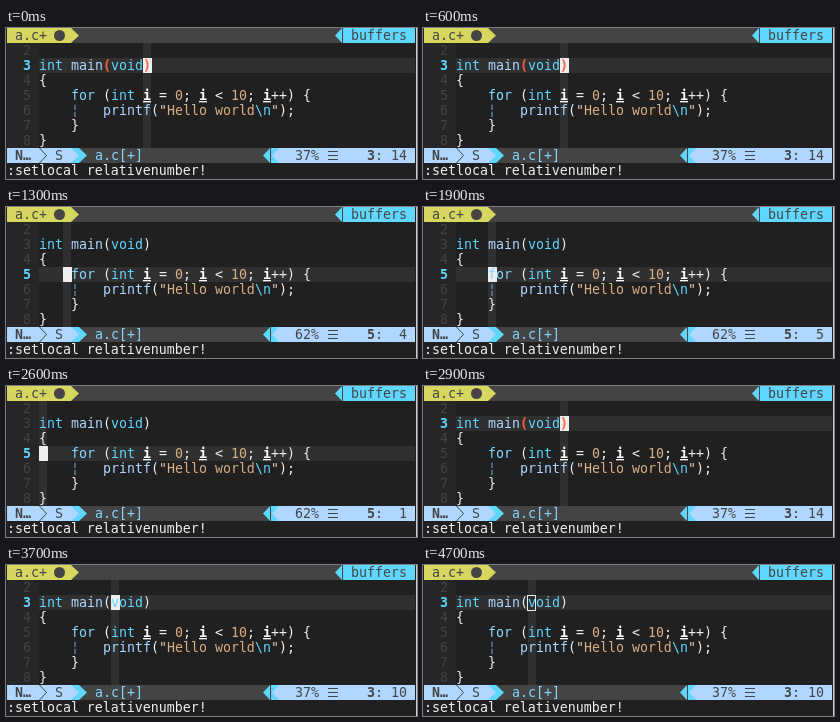
Recreate the animation shown at these times as an HTML page. Size 411 by 151 pixels, loop 4900 ms.

```html
<!DOCTYPE html>
<html lang="en">
<head>
<meta charset="utf-8">
<title>Editor cursor</title>
<style>
  html, body { margin: 0; width: 100%; height: 100%; overflow: hidden; background: #202020; }
  svg { display: block; width: 411px; height: 151px; }
  text { font: 13.288px "DejaVu Sans Mono", "Liberation Mono", monospace; white-space: pre; fill: #eee; }
  .dark { fill: #444; }
  .bold { font-weight: bold; }
  .num { fill: #444; }
  .num.on { fill: #5fd7ff; font-weight: bold; }
  .type, .esc { fill: #5fd7ff; }
  .name { fill: #afd7ff; }
  .loop { fill: #87d7ff; }
  .var { fill: #fff; font-weight: bold; text-decoration: underline; }
  .lit { fill: #d7af87; }
  .quote { fill: #e4d0c0; }
  .guide { fill: #6f9fb5; }
  .match { fill: #ff5f3f; font-weight: bold; }
  .hint { fill: #303030; }
  .bar { fill: #444; }
  .cyan { fill: #5fd7ff; }
  .pale { fill: #afd7ff; }
</style>
</head>
<body>
<svg viewBox="0 0 411 151">
  <rect width="411" height="151" fill="#202020"/>
  <rect x="1" y="15" width="32" height="105" fill="#262626"/>
  <rect id="line" class="hint" x="33" width="376" height="15"/>
  <rect id="column" class="hint" y="15" width="8" height="105"/>

  <rect class="bar" x="1" width="408" height="15"/>
  <path d="M1 0H65L73 7.5L65 15H1Z" fill="#d7d75f"/>
  <circle cx="53.5" cy="7.5" r="5.5" class="dark"/>
  <path class="cyan" d="M409 0H337V15H409ZM336 0L329 7.5L336 15Z"/>

  <rect class="bar" x="1" y="120" width="408" height="15"/>
  <path class="cyan" d="M65 120H73L81 127.5L73 135H65Z"/>
  <path class="pale" d="M1 120H65L73 127.5L65 135H1Z"/>
  <path d="M33.5 120L40.5 127.5L33.5 135" fill="none" stroke="#444"/>
  <path class="cyan" d="M264 120L257 127.5L264 135ZM265 120H273V135H265Z"/>
  <path class="pale" d="M409 120H273L266 127.5L273 135H409Z"/>
  <path d="M322 123.5H332M322 127.5H332M322 131.5H332" stroke="#444"/>

  <path d="M410.5 0V151" stroke="#ccc"/>

  <rect id="block" width="9" height="15" fill="#eee"/>
  <rect id="hollow" width="8" height="15" fill="none" stroke="#eee"/>
  <g id="texts"></g>
</svg>
<script>
const $ = id => document.getElementById(id);
const CELL = 8, ROW = 15, LOOP = 4900, BLUR = 4700;

// Places text on the character grid.
function put(row, col, str, cls = '') {
  const t = document.createElementNS('http://www.w3.org/2000/svg', 'text');
  t.setAttribute('x', 1 + col * CELL);
  t.setAttribute('y', row * ROW + 12);
  t.setAttribute('class', cls);
  t.textContent = str;
  return $('texts').appendChild(t);
}

put(0, 1, 'a.c+', 'dark');
put(0, 43, 'buffers', 'dark');
put(8, 1, 'N…', 'dark bold');
put(8, 6, 'S', 'dark');
put(8, 11, 'a.c[+]', 'loop');
put(9, 0, ':setlocal relativenumber!');
const percent = put(8, 36, '', 'dark');
const lineNo = put(8, 45, '', 'dark bold');
const colNo = put(8, 46, '', 'dark');

const numbers = {};
for (let n = 2; n <= 8; n++) numbers[n] = put(n - 1, 2, n, 'num');

// Writes consecutive "class|text" runs of one code line.
function code(line, ...runs) {
  let col = 4;
  return runs.map(run => {
    const cut = run.indexOf('|');
    const str = run.slice(cut + 1), lead = str.length - str.trimStart().length;
    const t = put(line - 1, col + lead, str.trim(), run.slice(0, cut));
    col += str.length;
    return t;
  });
}

const head = code(3, 'type|int', 'name| main', '|(', 'type|void', '|)');
const open = code(4, '|{');
code(5, 'loop|    for', '| (', 'type|int', 'var| i', '| =', 'lit| 0', '|;', 'var| i',
  '| <', 'lit| 10', '|;', 'var| i', '|++)', '| {');
code(6, 'guide|    ¦', 'name|   printf', '|(', 'quote|"', 'lit|Hello world', 'esc|\\n', 'quote|"', '|);');
code(7, '|    }');
const close = code(8, '|}');

// [start ms, line, column]
const moves = [
  [0, 3, 14], [400, 3, 13], [600, 3, 14], [700, 4, 1], [900, 5, 1], [1000, 5, 2],
  [1200, 5, 3], [1300, 5, 4], [1500, 5, 5], [1600, 5, 6], [1900, 5, 5], [2100, 5, 4],
  [2300, 5, 3], [2400, 5, 2], [2600, 5, 1], [2800, 4, 1], [2900, 3, 14], [3000, 3, 13],
  [3200, 3, 12], [3500, 3, 11], [3700, 3, 10]
];

function place(el, x, y) {
  el.setAttribute('x', x);
  el.setAttribute('y', y);
}

function show(line, col, focused) {
  const x = 25 + col * CELL, y = (line - 1) * ROW;
  place($('block'), x, y);
  place($('hollow'), x - 0.5, y + 0.5);
  $('block').style.display = focused ? '' : 'none';
  $('hollow').style.display = focused ? 'none' : '';
  $('line').setAttribute('y', y);
  $('column').setAttribute('x', x);

  for (const n in numbers) numbers[n].classList.toggle('on', +n === line);
  const parens = line === 3 && col === 14, braces = line === 4;
  for (const t of [head[2], head[4]]) t.classList.toggle('match', parens);
  for (const t of [open[0], close[0]]) t.classList.toggle('match', braces);

  percent.textContent = Math.floor(line / 8 * 100) + '%';
  lineNo.textContent = line;
  colNo.textContent = ': ' + String(col).padStart(2);
}

let last = '';
function tick() {
  const t = performance.now() % LOOP;
  const [, line, col] = moves.findLast(m => m[0] <= t);
  const focused = t < BLUR, key = [line, col, focused].join();
  if (key !== last) show(line, col, focused);
  last = key;
  requestAnimationFrame(tick);
}
tick();
</script>
</body>
</html>
```
